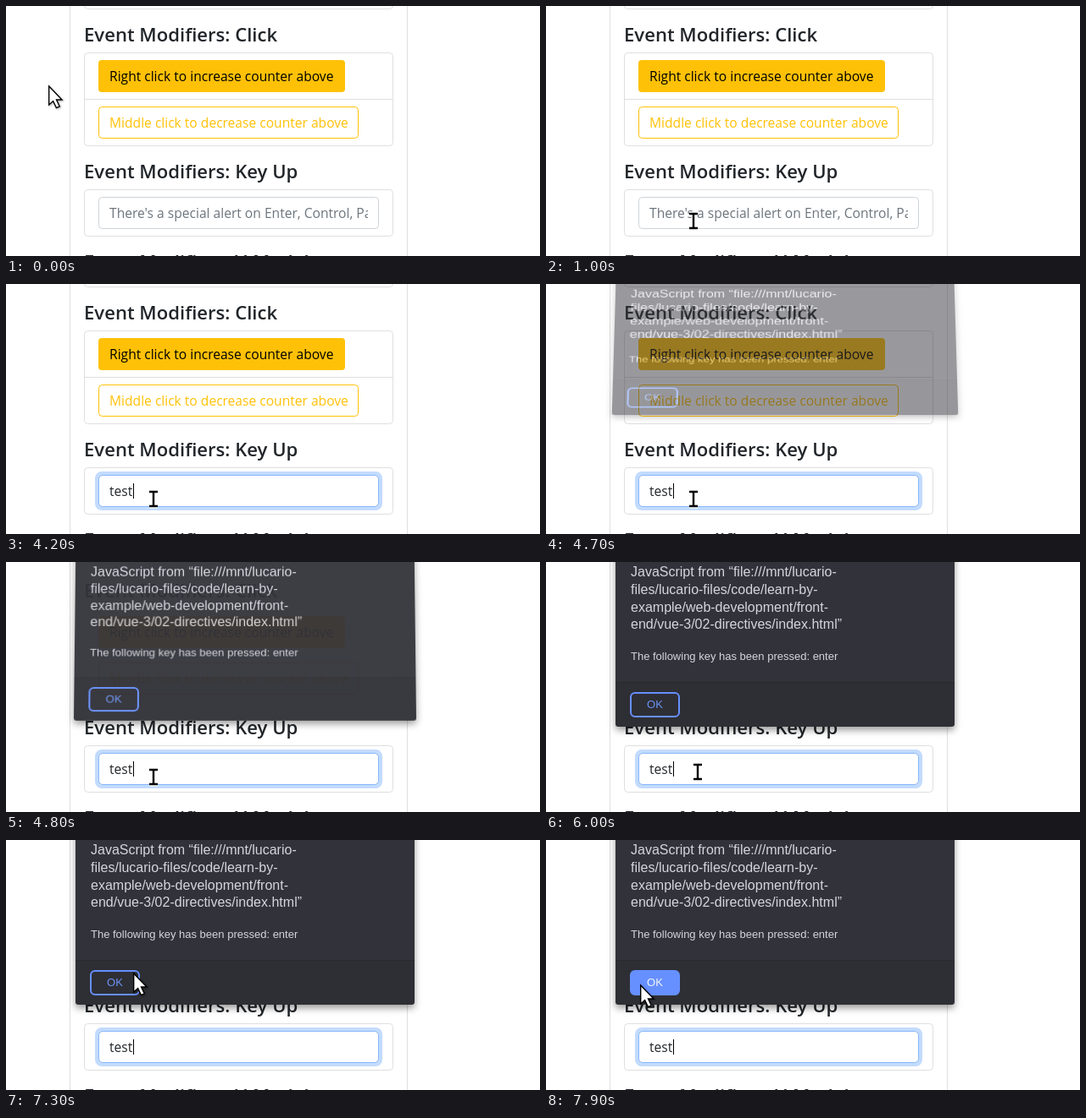
Recreate the animation shown at these times as an HTML page. Size 630 by 296 pixels, loop 8000 ms.

```html
<!DOCTYPE html>
<html lang="en">
<head>
<meta charset="utf-8">
<style>
  html, body { margin: 0; width: 100%; height: 100%; overflow: hidden; background: #fff; }
  svg, #dialog { position: absolute; left: 0; top: 0; }
  text { font: 15.6px "Open Sans", sans-serif; }
  .title { font-size: 22.1px; font-weight: 600; fill: #212529; }
  .line { fill: none; stroke: #dfdfdf; }
  #dialog {
    left: 82px; top: -160px; width: 400px; height: 355px; border-radius: 3px;
    background: linear-gradient(#32323a 302px, #29292f 302px, #29292f 303px, #2e2e35 303px);
    box-shadow: 0 4px 8px rgba(0, 0, 0, .4);
    transform-origin: 200px 172px;
    font-family: "Liberation Sans", Arial, sans-serif; color: #d5d5dd;
  }
  #dialog > * { position: absolute; left: 18px; margin: 0; white-space: nowrap; }
  #source { top: 162px; font-size: 16px; line-height: 20.8px; }
  #message { top: 261px; font-size: 13px; line-height: 21px; }
  #dialog #ok {
    left: 17px; top: 314px; width: 59px; height: 30px; box-sizing: border-box;
    border: 2px solid #6690ff; border-radius: 6px; color: #6c94f5;
    font-size: 13px; line-height: 26px; text-align: center;
  }
  #dialog #ok.active { background: #6690ff; color: #f4f6ff; }
</style>
</head>
<body>
<svg width="630" height="296">
  <path class="line" d="M75.5 0V296M473.5 0V296M92.5 110.5H456.5"/>
  <rect class="line" x="92.5" y="-40.5" width="364" height="44" rx="4"/>
  <rect class="line" x="92.5" y="55.5" width="364" height="110" rx="4"/>
  <rect class="line" x="92.5" y="217.5" width="364" height="55" rx="4"/>
  <text class="title" x="92" y="42">Event Modifiers: Click</text>
  <text class="title" x="92" y="204">Event Modifiers: Key Up</text>
  <text class="title" x="92" y="311">Event Modifiers: V-Model</text>
  <rect x="109" y="64" width="291" height="38" rx="4" fill="#ffc107"/>
  <text x="122" y="89">Right click to increase counter above</text>
  <rect x="109.5" y="119.5" width="306" height="37" rx="4" fill="none" stroke="#ffc107"/>
  <text x="122" y="144" fill="#ffc107">Middle click to decrease counter above</text>
  <rect x="109.5" y="226.5" width="330" height="37" rx="4" fill="#fff" stroke="#ced4da"/>
  <g id="focus" fill="none">
    <rect x="107" y="224" width="335" height="42" rx="6" stroke="#c2dbfe" stroke-width="4"/>
    <rect x="109.5" y="226.5" width="330" height="37" rx="4" stroke="#86b7fe"/>
  </g>
  <svg x="122" y="227" width="305" height="36">
    <text id="value" y="24"></text>
  </svg>
  <rect id="caret" y="236" width="1" height="18"/>
</svg>

<div id="dialog">
  <p id="source">JavaScript from “file:///mnt/lucario-<br>files/lucario-files/code/learn-by-<br>example/web-development/front-<br>end/vue-3/02-directives/index.html”</p>
  <p id="message">The following key has been pressed: enter</p>
  <div id="ok">OK</div>
</div>

<svg width="630" height="296">
  <g id="pointer">
    <path id="arrow" d="M.7 1V23L5.6 18.6 9.4 26.6 13.2 24.8 9.5 17H16Z" fill="#fff" stroke="#000" stroke-width="1.4"
      style="filter: drop-shadow(1px 1px 1px rgba(0, 0, 0, .35))"/>
    <g id="beam" fill="none">
      <path d="M-5 -8H5M0 -8V9M-5 9H5" stroke="#fff" stroke-width="5"/>
      <path d="M-5 -8H5M0 -8V9M-5 9H5" stroke="#000" stroke-width="2.4"/>
    </g>
  </g>
</svg>

<script>
const LOOP = 8000, STEP = 100;
const PLACEHOLDER = "There's a special alert on Enter, Control, Pause";
const $ = id => document.getElementById(id);
const clamp = v => Math.min(1, Math.max(0, v));
const smooth = v => (v = clamp(v)) * v * (3 - 2 * v);

// Pointer stops after the first move: time, x, y
const stops = [
  [5900, 174, 254], [6000, 179, 248], [6200, 265, 192], [6400, 362, 137], [6500, 381, 124],
  [6600, 361, 129], [6800, 341, 123], [7000, 296, 115], [7200, 190, 142], [7400, 109, 172],
  [7500, 98, 175], [7650, 98, 175], [7900, 111, 171]
];

// Typed text: time, value, caret x
const typing = [[0, "", 122], [2400, "t", 128], [2700, "tes", 144], [3000, "test", 150]];

function pointerAt(t) {
  if (t <= stops[0][0]) {
    const p = smooth(t / 940);
    return [50 + 124 * p, 94 + 160 * p];
  }
  const i = stops.findIndex(s => s[0] >= t);
  if (i < 0) return stops[stops.length - 1].slice(1);
  const a = stops[i - 1], b = stops[i], p = (t - a[0]) / (b[0] - a[0]);
  return [a[1] + (b[1] - a[1]) * p, a[2] + (b[2] - a[2]) * p];
}

function show(el, visible) {
  el.style.display = visible ? "" : "none";
}

function drawInput(t) {
  const [, value, caretX] = typing.filter(k => k[0] <= t).pop();
  $("focus").style.opacity = smooth((t - 1350) / 220);
  $("value").textContent = value || PLACEHOLDER;
  $("value").setAttribute("fill", value ? "#212529" : "#6c757d");
  $("caret").setAttribute("x", caretX);
  show($("caret"), t >= 1400 && !(t >= 1900 && t < 2400) && !(t >= 3600 && t < 4200));
}

function drawDialog(t) {
  const [angle, opacity] = t < 4800 ? [40, .5] : t < 5000 ? [18, .95] : [0, 1];
  const dialog = $("dialog");
  show(dialog, t >= 4700);
  dialog.style.opacity = opacity;
  dialog.style.transform = angle ? `perspective(5600px) rotateX(${angle}deg)` : "none";
  $("ok").classList.toggle("active", t >= 7700);
}

function drawPointer(t) {
  const [x, y] = pointerAt(t).map(Math.round);
  const overInput = x > 109 && x < 440 && y > 226;
  $("pointer").setAttribute("transform", `translate(${x} ${y})`);
  show($("beam"), overInput);
  show($("arrow"), !overInput);
}

function frame() {
  const t = Math.floor(performance.now() % LOOP / STEP) * STEP;
  drawInput(t);
  drawDialog(t);
  drawPointer(t);
  requestAnimationFrame(frame);
}
frame();
</script>
</body>
</html>
```
